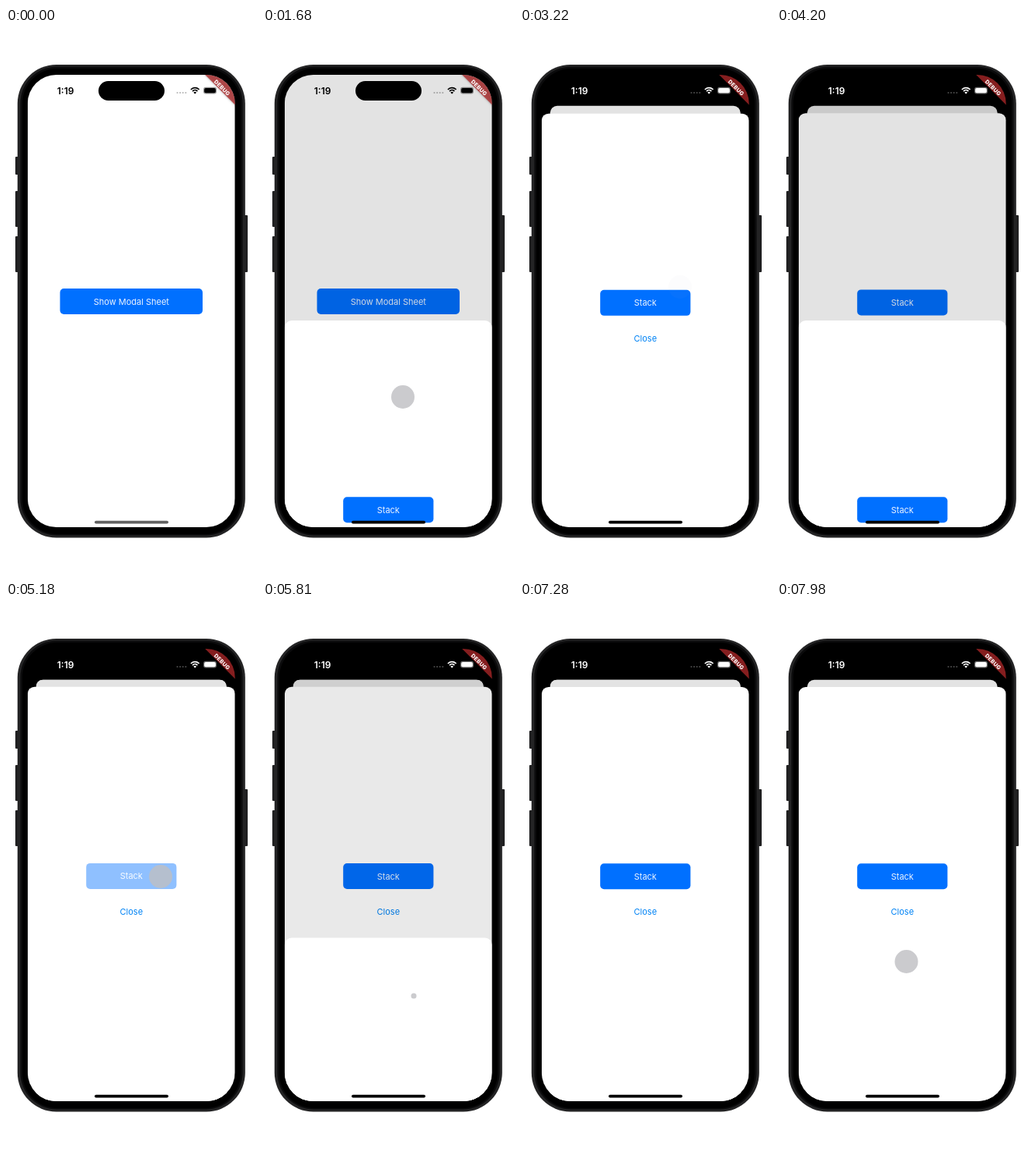
Recreate the animation shown at these times as an HTML page with a canvas. Size 323 px wide and 700 px high, loop 8 s.

```html
<!DOCTYPE html>
<html lang="en">
<head>
<meta charset="utf-8">
<title>Stacked modal sheets</title>
<style>
html, body { margin: 0; width: 100%; height: 100%; overflow: hidden; background: #fff; }
canvas { display: block; width: 323px; height: 700px; }
</style>
</head>
<body>
<canvas id="stage"></canvas>
<script>
const W = 323, H = 700, LOOP = 8000, STEP = 70;
const SCREEN = { x: 27.8, y: 60, w: 266.9, h: 580, r: 37 };
const CENTER = 161.3, FULL = 109, HALF = 375, OFF = 640, BACK = 99.8;
const BLUE = '#0070ff';
const FONT = 'Inter, Roboto, sans-serif';

const canvas = document.getElementById('stage');
const ctx = canvas.getContext('2d');
const dpr = window.devicePixelRatio || 1;
canvas.width = W * dpr;
canvas.height = H * dpr;

const clamp = v => Math.max(0, Math.min(1, v));
const ramp = (t, a, b) => clamp((t - a) / (b - a));
const eases = {
  lin: u => u,
  out: u => 1 - (1 - u) ** 3,
  in: u => u * u,
  both: u => u * u * (3 - 2 * u)
};

// Keys are [time, value, ease into this key].
function track(t, keys) {
  if (t <= keys[0][0]) return keys[0][1];
  for (let i = 1; i < keys.length; i++) {
    const [t1, v1, ease = 'lin'] = keys[i];
    const [t0, v0] = keys[i - 1];
    if (t < t1) return v0 + (v1 - v0) * eases[ease]((t - t0) / (t1 - t0));
  }
  return keys[keys.length - 1][1];
}

// Top edge of each sheet over time.
const sheets = [
  [[890, OFF], [1580, HALF, 'out'], [1700, HALF], [2500, 234, 'both'],
   [3150, FULL + 0.9, 'out'], [3300, FULL + 0.4], [5180, FULL]],
  [[3640, OFF], [4200, HALF, 'out'], [4300, HALF], [4630, 236, 'both'],
   [5000, FULL, 'out'], [5180, FULL - 0.3], [7440, FULL], [7700, 290, 'in'], [7920, OFF]],
  [[5360, OFF], [5880, 430, 'out'], [5950, 300], [6290, FULL, 'out'],
   [6470, FULL], [6720, 303, 'in'], [7130, OFF]]
];

// Touches grow in, move from a to b, then fade out.
const touches = [
  { on: 350, off: 780, a: [188, 351], b: [188, 351], move: [350, 780] },
  { on: 1590, off: 2935, a: [180, 473], b: [206, 332], move: [1700, 2500] },
  { on: 3400, off: 3590, a: [202, 352], b: [202, 352], move: [3400, 3590] },
  { on: 4200, off: 4660, a: [196, 470], b: [200, 331], move: [4300, 4630] },
  { on: 5080, off: 5250, a: [199, 352], b: [199, 352], move: [5080, 5250] },
  { on: 5790, off: 6000, a: [194, 505], b: [190, 352], move: [5850, 5990] },
  { on: 6380, off: 6780, a: [191, 226], b: [180, 420], move: [6470, 6720], ease: 'in' },
  { on: 7390, off: 7990, a: [172, 280], b: [166.5, 461], move: [7440, 7700], ease: 'in' }
];

// Fill opacity of a button pressed from a to b.
const pressed = (t, a, b) => 1 - 0.56 * ramp(t, a, a + 70) * (1 - ramp(t, b, b + 200));

function box(x, y, w, h, r, fill) {
  ctx.beginPath();
  ctx.roundRect(x, y, w, h, r);
  ctx.fillStyle = fill;
  ctx.fill();
}

function disc(x, y, r, fill) {
  ctx.beginPath();
  ctx.arc(x, y, r, 0, Math.PI * 2);
  ctx.fillStyle = fill;
  ctx.fill();
}

function label(str, x, y, size, color, weight = 400) {
  ctx.font = `${weight} ${size}px ${FONT}`;
  ctx.textAlign = 'center';
  ctx.textBaseline = 'alphabetic';
  ctx.fillStyle = color;
  ctx.fillText(str, x, y + size * 0.36);
}

function button(str, x, y, w, alpha) {
  ctx.save();
  ctx.globalAlpha = alpha;
  box(x, y, w, 33, 5, BLUE);
  ctx.restore();
  label(str, CENTER, y + 16.6, 11, 'rgba(255,255,255,.92)');
}

function dim(amount) {
  ctx.fillStyle = `rgba(0,0,0,${0.11 * amount})`;
  ctx.fillRect(SCREEN.x, SCREEN.y, SCREEN.w, SCREEN.h);
}

// Draws a layer shrunk by q, its top edge moving from top towards BACK.
function layer(top, q, radius, paint) {
  const s = 1 - 0.082 * q;
  ctx.save();
  ctx.translate(CENTER, top + (BACK - top) * q);
  ctx.scale(s, s);
  ctx.translate(-CENTER, 0);
  box(SCREEN.x, 0, SCREEN.w, 640, [radius, radius, 0, 0], '#fff');
  paint();
  ctx.restore();
}

function device() {
  const side = '#202021';
  for (const [y, h] of [[165, 23], [209, 46], [267, 46]]) box(12, y, 5, h, 1, side);
  box(306, 240, 5, 73, 1, side);
  box(14.8, 47, 293, 606.5, 50, '#242425');
  box(18.5, 49.5, 286, 601, 47, '#0b0b0c');
  box(21, 52, 281, 597, 45, '#000');
}

function banner() {
  ctx.save();
  ctx.translate(SCREEN.x + SCREEN.w, SCREEN.y);
  ctx.rotate(Math.PI / 4);
  ctx.save();
  ctx.shadowColor = 'rgba(0,0,0,.5)';
  ctx.shadowBlur = 3 * dpr;
  box(-32, 14, 64, 13.2, 0, 'rgba(178,40,42,.75)');
  ctx.restore();
  ctx.letterSpacing = '0.3px';
  label('DEBUG', 0, 23.4, 7, '#fff', 800);
  ctx.restore();
}

function statusBar(ink) {
  label('1:19', 76.6, 80.2, 12, ink, 600);
  box(119, 68, 85, 25, 12.5, '#000');

  ctx.save();
  ctx.globalAlpha = 0.28;
  for (let i = 0; i < 4; i++) disc(220.5 + i * 3.6, 83, 1.1, ink);
  ctx.restore();

  ctx.strokeStyle = ink;
  ctx.lineWidth = 1.7;
  for (const r of [4.3, 7.3]) {
    ctx.beginPath();
    ctx.arc(243.2, 84, r, -Math.PI * 0.76, -Math.PI * 0.24);
    ctx.stroke();
  }
  ctx.beginPath();
  ctx.moveTo(243.2, 84.6);
  ctx.arc(243.2, 84.6, 2.6, -Math.PI * 0.76, -Math.PI * 0.24);
  ctx.fillStyle = ink;
  ctx.fill();

  ctx.save();
  ctx.globalAlpha = 0.4;
  box(254, 75.8, 17, 8.6, 3, ink);
  ctx.restore();
  box(255.2, 76.9, 14.6, 6.4, 2, ink);
}

function drawTouch(t, touch) {
  const size = ramp(t, touch.on, touch.on + 85);
  const alpha = 1 - ramp(t, touch.off, touch.off + 300);
  if (!size || !alpha) return;
  const u = eases[touch.ease || 'both'](ramp(t, ...touch.move));
  const [x, y] = touch.a.map((v, i) => v + (touch.b[i] - v) * u);
  disc(x, y, 15 * size, `rgba(190,190,194,${0.8 * alpha})`);
}

function draw(t) {
  ctx.setTransform(dpr, 0, 0, dpr, 0, 0);
  ctx.fillStyle = '#fff';
  ctx.fillRect(0, 0, W, H);
  device();

  const tops = sheets.map(keys => track(t, keys));
  const shrink = tops.map(top => clamp((HALF - top) / (HALF - FULL)));
  const shade = tops.map(top => clamp((OFF - top) / (OFF - HALF)));
  const stackAlpha = [1, pressed(t, 5100, 5250), 1];
  stackAlpha[0] = pressed(t, 3420, 3590);

  ctx.save();
  ctx.beginPath();
  ctx.roundRect(SCREEN.x, SCREEN.y, SCREEN.w, SCREEN.h, SCREEN.r);
  ctx.clip();
  ctx.fillStyle = '#000';
  ctx.fillRect(SCREEN.x, SCREEN.y, SCREEN.w, SCREEN.h);

  // The screen content is slightly soft, unlike the device around it.
  ctx.filter = `blur(${0.45 * dpr}px)`;
  layer(SCREEN.y, shrink[0], 10 * shrink[0], () =>
    button('Show Modal Sheet', 69.5, 274, 183.5, pressed(t, 370, 780)));

  tops.forEach((top, i) => {
    if (top >= OFF) return;
    dim(shade[i]);
    layer(top, shrink[i + 1] || 0, 9, () => {
      button('Stack', 103.2, 226.2, 116.2, stackAlpha[i]);
      label('Close', CENTER, 288, 11, '#0083f5');
    });
  });

  banner();
  statusBar(shrink[0] > 0.5 ? '#fff' : '#000');
  box(114, 631.7, 95, 3.8, 1.9, `rgba(0,0,0,${track(t, [[0, 0.62], [500, 1]])})`);
  touches.forEach(touch => drawTouch(t, touch));
  ctx.restore();
}

const start = performance.now();
function tick() {
  const t = (performance.now() - start) % LOOP;
  draw(Math.floor(t / STEP) * STEP);
  requestAnimationFrame(tick);
}
tick();
</script>
</body>
</html>
```
